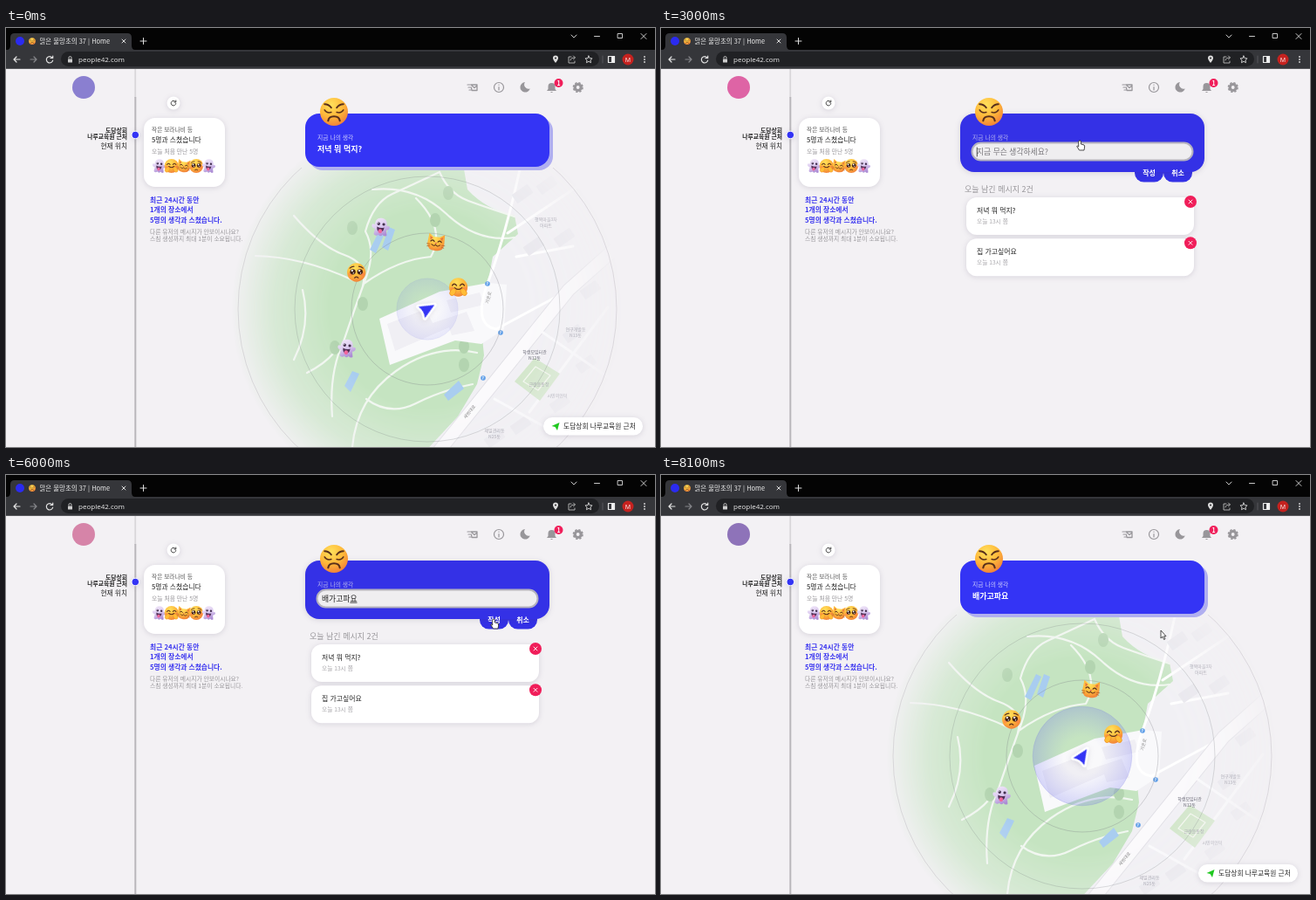
Recreate the animation shown at these times as an HTML page. Size 744 by 480 pixels, loop 8.2 s.

```html
<!DOCTYPE html>
<html lang="ko">
<head>
<meta charset="utf-8">
<title>Home</title>
<style>
html, body { margin: 0; width: 100%; height: 100%; overflow: hidden; background: #f3f1f4; }
svg { display: block; }
text { font-family: 'Noto Sans CJK KR', 'Noto Sans CJK', 'Noto Sans', sans-serif; }
.b { font-weight: 700; }
.ui { font-family: 'Open Sans', sans-serif; }
.rest { opacity: calc(1 - var(--p)); }
.act { opacity: var(--p); }
.tilt { transform: rotate(calc(8deg - var(--p) * 12deg)); transform-origin: 16px 16px; }
.soft { filter: drop-shadow(0 1px 3px rgba(60, 50, 90, .16)); }
</style>
</head>
<body>
<svg id="stage" width="744" height="480" viewBox="0 0 744 480"></svg>
<script>
const LOOP = 8200, OPEN = 2300, SUBMIT = 6400;
const BLUE = '#3434f5', GREY = '#98969a', CX = 483, CY = 322;
const PLACE = ['도담상회', '나루교육원 근처'];
const stage = document.getElementById('stage');

// markup helpers
const text = (x, y, size, str, fill = '#222', more = '') =>
  `<text x="${x}" y="${y}" font-size="${size}" fill="${fill}" ${more}>${str}</text>`;
const rect = (x, y, w, h, r, fill, more = '') =>
  `<rect x="${x}" y="${y}" width="${w}" height="${h}" rx="${r}" fill="${fill}" ${more}/>`;
const disc = (x, y, r, fill, more = '') => `<circle cx="${x}" cy="${y}" r="${r}" fill="${fill}" ${more}/>`;
const fill = (d, color, more = '') => `<path d="${d}" fill="${color}" ${more}/>`;
const line = (d, color, w = 1, more = '') =>
  `<path d="${d}" fill="none" stroke="${color}" stroke-width="${w}" stroke-linecap="round" stroke-linejoin="round" ${more}/>`;
const group = (id, body, more = '') => `<g id="${id}" ${more}>${body}</g>`;
const emoji = (kind, x, y, size, more = '') =>
  `<use href="#${kind}" x="${x - size / 2}" y="${y - size / 2}" width="${size}" height="${size}" ${more}/>`;
const symbol = (id, body) => `<symbol id="${id}" viewBox="0 0 32 32" overflow="visible">${body}</symbol>`;
const stop = (o, c, more = '') => `<stop offset="${o}" stop-color="${c}" ${more}/>`;
const bold = 'class="b"', mid = 'text-anchor="middle"', end = 'text-anchor="end"';

// emoji
const DARK = '#59301c';
const face = disc(16, 16, 15.5, 'url(#skin)');
const blush = disc(6, 19, 3.5, '#ff7350', 'opacity=".5"') + disc(26, 19, 3.5, '#ff7350', 'opacity=".5"');
const puff = x => disc(x, 26, 3.6, '#f7e9f0') + disc(x - 3, 28, 3, '#eee0ef') + disc(x + 3, 28.5, 3, '#fff5f5');
const hand = (x, a) => `<ellipse cx="${x}" cy="24" rx="4.5" ry="6.5" fill="#ffbd36" stroke="#ea8422" stroke-width=".8" transform="rotate(${a} ${x} 24)"/>`;
const symbols = [
  symbol('huff', face +
    line('M5.500 7.500Q10 7.500 13 11.500M26.500 7.500Q22 7.500 19 11.500', DARK, 1.8) +
    line('M5.500 14Q8 18 13 16.500M26.500 14Q24 18 19 16.500', DARK, 1.5) +
    line('M9.500 26Q10 21 16 21T22.500 26', DARK, 2, 'class="rest"') +
    `<g class="act">${line('M10.500 25Q11 21 16 21T21.500 25', DARK, 2)}${puff(4)}${puff(28)}</g>`),
  symbol('plead', face + blush + line('M5 9Q8 6 12 6M27 9Q24 6 20 6', DARK, 1.6) +
    `<g class="rest">${[10, 22].map(x => disc(x, 15, 4.6, '#432318') + disc(x - 1, 13, 1.7, '#fff') + disc(x + 1, 17, 1, '#fff')).join('')}</g>` +
    line('M5 15Q10 19 13 15M19 15Q22 19 27 15', DARK, 2, 'class="act"') +
    line('M13 25Q16 22 19 25', DARK, 1.8)),
  symbol('hug', face + blush + line('M6 13Q9 8 13 13M19 13Q23 8 26 13', DARK, 2) +
    `<g class="act">${fill('M7 18Q16 22 25 18Q23 25 16 25T7 18', '#7b2a22')}${fill('M12 24Q16 21 20 24Q16 26 12 24', '#ff7170')}</g>` +
    `<g class="rest">${line('M10 17Q16 22 22 17', DARK, 2)}${hand(7, 35)}${hand(25, -35)}</g>`),
  symbol('cat', `<g class="tilt">${fill('M3 2L11 7H21L29 2 30 18Q30 30 16 30T2 18Z', 'url(#skin)')}` +
    fill('M5 6l5 3-4 4zM27 6l-5 3 4 4z', '#e8773c') +
    line('M7 15Q10 11 13 15M19 15Q22 11 25 15', DARK, 1.8) +
    fill('M14 17h4l-2 2z', '#d6455a') +
    line('M9 20Q13 24 16 20Q19 24 23 20', DARK, 1.5) +
    `<g class="act">${fill('M12 22H20Q20 27 16 27T12 22', '#86302c')}</g>` +
    line('M1 20H6M2 24L6 23M31 20H26M30 24L26 23', '#a65a25', .9) + '</g>'),
  symbol('ghost', `<g class="tilt">${fill('M16 1C24 1 26 7 26 13Q31 11 31 15T26 20L28 29Q24 32 21 28 18 33 14 29 10 33 6 29L7 20Q1 19 1 15T6 13C6 6 8 1 16 1', 'url(#spook)')}` +
    disc(12, 11, 2.5, '#443150') + disc(20.5, 11, 2.3, '#443150') + disc(11.3, 10, .8, '#fff') +
    fill('M10 16Q16 19 22 16Q22 24 16 24T10 16', '#503056') +
    fill('M13 21Q16 18 19 21V25Q16 28 13 25Z', '#f1679c') + '</g>')
].join('');

const defs = `<defs>
<radialGradient id="skin" cx=".4" cy=".25" r=".85">${stop(0, '#ffe15c')}${stop(.5, '#ffb93a')}${stop(1, '#ee7538')}</radialGradient>
<linearGradient id="spook" x2=".6" y2="1">${stop(0, '#f6eefb')}${stop(.55, '#dccbf0')}${stop(1, '#ab8cd4')}</linearGradient>
<radialGradient id="fade" gradientUnits="userSpaceOnUse" cx="${CX}" cy="${CY}" r="225">${stop(.5, '#fff')}${stop(.78, '#fff', 'stop-opacity=".6"')}${stop(1, '#fff', 'stop-opacity="0"')}</radialGradient>
<mask id="spot">${rect(250, 150, 480, 330, 0, 'url(#fade)')}</mask>
<clipPath id="below">${rect(250, 160, 494, 320, 0, '#fff')}</clipPath>
<radialGradient id="wave">${stop(0, '#7777ee', 'id="waveIn" stop-opacity="0"')}${stop(1, '#6464ee', 'id="waveOut"')}</radialGradient>
${symbols}</defs>`;

// browser window
const chrome = rect(0, 0, 744, 46.8, 0, '#35363a') + rect(0, 0, 744, 25, 0, '#040404') +
  fill('M1 25Q5 25 5 20V11Q5 6 10 6H139Q144 6 144 11V20Q144 25 148 25Z', '#35363a') +
  disc(16, 15, 5, '#2b2bf0') + emoji('huff', 30, 15, 8) +
  text(38.5, 18, 7.45, '맑은 물망초의 37 | Home', '#eee') +
  line('M133 13l4 4m0-4l-4 4M154 15h7m-3.500-3.500v7', '#ddd') +
  line('M648 8l3 3 3-3M674.500 9.500h6M701.500 6.500h5v5h-5zM728 6.500l6 6m0-6l-6 6', '#ddd', .9) +
  rect(63, 27, 617, 17, 8.5, '#202124') +
  line('M16 36H9l3-3m-3 3l3 3', '#e4e4e4', 1.2) + line('M28 36h7l-3-3m3 3l-3 3', '#85868a', 1.2) +
  line('M53 34a3.700 3.700 0 1 0 .7 3M53.700 32v2.500H51', '#e4e4e4', 1.2) +
  rect(71, 35.5, 5, 4, .5, '#ccc') + line('M72 35v-1a1.500 1.500 0 0 1 3 0v1', '#ccc', .9) +
  text(83, 38.8, 8, 'people42.com', '#eee', 'class="ui"') +
  fill('M630 40Q627 36 627 34.500a3 3 0 0 1 6 0Q633 36 630 40', '#ddd') + disc(630, 34.5, 1, '#202124') +
  line('M648 33h-3v7h7v-2M647 37q0-3 5-3m-1.500-2l2 2-2 2', '#bbb', .9) +
  line('M668 32l1.200 2.600 2.800.3-2 2 .5 2.800-2.500-1.400-2.500 1.400.5-2.800-2-2 2.800-.3z', '#ddd', .9) +
  line('M684 32v8', '#606166', .8) + line('M690.500 32.500h7v7h-7z', '#eee', 1.2) + rect(694, 32, 4, 8, 0, '#eee') +
  disc(713, 36, 6.5, '#c5221f') + text(713, 38.5, 7, 'M', '#fff', `class="ui" ${mid}`) +
  [33, 36, 39].map(y => disc(732, y, .9, '#ddd')).join('');

// left column
const side = rect(147.3, 47, 1.8, 33, 0, '#d9d7da') + rect(147.3, 79, 2, 401, 0, '#b9b7bb') +
  disc(148.3, 122.5, 4.3, BLUE, 'stroke="#fff" stroke-width="1" class="soft"') +
  disc(89, 68, 13, '#8a7fd0', 'id="logo"') +
  text(139, 119.5, 6.8, PLACE[0], '#222', `${bold} ${end}`) +
  text(139, 127.3, 6.8, PLACE[1], '#222', `${bold} ${end}`) +
  text(139, 138, 7.7, '현재 위치', '#222', end) +
  disc(192, 86, 7.5, '#fff', 'class="soft"') +
  line('M194.300 84.500a2.800 2.800 0 1 0 .5 2M194.800 83v2h-2', '#333', .9) +
  rect(158, 103, 93, 79, 13, '#fff', 'class="soft"') +
  text(167, 119, 6.7, '작은 보라나비 등', '#555') +
  text(167, 131, 7.8, '5명과 스쳤습니다') +
  text(167, 144, 6.8, '오늘 처음 만난 5명', GREY) +
  ['ghost', 'hug', 'cat', 'plead', 'ghost'].map((k, i) => emoji(k, 175.5 + i * 14.2, 158, 16.5)).join('') +
  ['최근 24시간 동안', '1개의 장소에서', '5명의 생각과 스쳤습니다.'].map((s, i) => text(165, 199.5 + i * 11.6, 7.75, s, '#3a35f0', bold)).join('') +
  text(165, 236, 6.75, '다른 유저의 메시지가 안보이시나요?', GREY) +
  text(165, 244, 6.75, '스침 생성까지 최대 1분이 소요됩니다.', GREY);

const icons = line('M529 65h4m-3 3h3m-2 3h2', GREY, 1.2) + line('M533.500 65h6.500v6.500h-6l-.5-3M534 66l3 2.500 3-2.500', GREY, 1.3) +
  line('M570.500 68a5.500 5.500 0 1 1-11 0a5.500 5.500 0 1 1 11 0M565 67.500v3.500M565 65v.2', GREY, 1.2) +
  fill('M595 62a5.800 5.800 0 1 0 5.800 7.500A5 5 0 0 1 595 62', GREY) +
  fill('M620 72l1.500-2v-3q0-4 4-4t4 4v3l1.500 2zM624 73h3q-1.500 2-3 0', GREY) +
  disc(633.5, 63, 5, '#f01e5a') + text(633.5, 65.7, 7, '1', '#fff', `${bold} ${mid}`) +
  disc(655.7, 68, 3.5, 'none', `stroke="${GREY}" stroke-width="3.200"`) +
  disc(655.7, 68, 5.3, 'none', `stroke="${GREY}" stroke-width="1.600" stroke-dasharray="2.400 1.760"`);

// map
const label = (x, y, lines, color = '#8d8c99') => lines.map((s, i) => text(x, y + i * 6.5, 5, s, color, mid)).join('');
const land = rect(250, 150, 480, 330, 0, '#f1f0f4') +
  fill('M250 150H523L529 185Q550 208 583 215L587 236 558 262 552 294 545 345 548 375 540 408 518 445 476 490H250Z', '#c5e4c1') +
  line('M497 165Q465 180 443 190T412 233Q424 255 413 285T387 359Q370 395 374 445M286 261Q340 262 398 289M330 215Q360 250 388 260T409 295M345 395Q365 385 376 372M420 185Q470 180 505 213T583 240M497 165Q508 190 530 198T583 216M410 293Q450 265 487 262Q505 230 470 195M397 480Q402 425 447 393T540 372M413 425Q440 445 470 430T535 408M340 300Q350 340 330 380', '#f1f7f0', 2.2) +
  [[492, 220], [397, 229], [377, 366], [525, 386], [507, 189], [409, 316], [525, 365]].map(([x, y]) => `<ellipse cx="${x}" cy="${y}" rx="6" ry="8" fill="#b3d4b0"/>`).join('') +
  fill('M417 254L430 228 436 231 424 258ZM431 251L439 228 446 231 438 255ZM388 410l9-17 8 3-10 21zM502 420l17-16 6 9-18 14z', '#a9cdf0') +
  fill('M428 333L497 302 553 292 574 294 571 345 545 362 515 358 440 386Z', '#f9f9fb') +
  fill('M437 339l44-17 8 16 39-13 9 22-26 5-3-9-62 27zM505 312l38-9 5 14-38 9z', '#f0eff4') +
  line('M590 158Q572 240 553 290T562 345M575 235L680 165M562 345L640 303M585 262L650 250', '#fff', 3) +
  line('M735 220L645 300 492 490', '#e0dfe5', 16) + line('M735 220L645 300 492 490', '#fbfafc', 14) +
  [[592, 190], [620, 180], [605, 250], [640, 240], [650, 350], [635, 430], [590, 455], [665, 385], [560, 470], [670, 300]]
    .map(([x, y]) => rect(x - 11, y - 6, 22, 12, 1, '#e8e7ed', `transform="rotate(-35 ${x} ${y})"`)).join('') +
  line('M610 345L690 400M560 425L650 475M690 320L600 440', '#fafafc', 3) +
  fill('M583 405L606 378 635 396 612 427Z', '#cfe5c6') + line('M593 405l14-17 17 10-14 17z', '#f3f7ee', 1.2) +
  label(619, 221, ['행복마을3차', '아파트']) + label(606, 373, ['학생모임터관', 'N12동'], '#555463') +
  label(611, 410, ['근린운동장']) + label(653, 347, ['연구개발동', 'N13동']) + label(560, 463, ['제일관리동', 'N25동']) + label(632, 423, ['시민의언덕']) +
  text(553, 316, 5, '가온로', '#888', 'transform="rotate(-75 553 316)"') + text(527, 448, 5, '새벗대로', '#777', 'transform="rotate(-51 527 448)"') +
  [[552, 293], [567, 349], [547, 401]].map(([x, y]) => disc(x, y, 2.8, '#5f9ee8') + text(x, y + 1.7, 4.5, 'P', '#fff', mid)).join('');

const map = group('land', land, 'mask="url(#spot)"') +
  group('wide', label(467, 248, ['세한']) + label(463, 268, ['북쪽언덕길']) + label(482, 305, ['새마을']) + text(497, 325, 7, '대한민국', '#85848b', mid), 'clip-path="url(#below)"') +
  group('rings', [87, 152, 217].map((r, i) => disc(CX, CY, r, 'none', `stroke="#77767f" stroke-width=".6" opacity="${.5 - i * .08}"`)).join(''), 'clip-path="url(#below)"') +
  disc(CX, CY, 0, 'url(#wave)', 'id="pulse" stroke="#7272d8" stroke-width=".6"') +
  emoji('ghost', 429.5, 228, 22, 'id="guest"') + emoji('cat', 493, 245.5, 22) + emoji('plead', 401.7, 280, 22) +
  emoji('hug', 518.5, 297, 22) + emoji('ghost', 390.5, 367, 22) +
  group('arrow', fill('M0-9.500L7.500 7.500Q0 4-7.500 7.500Z', BLUE, 'stroke="#fff" stroke-width="5" stroke-linejoin="round" paint-order="stroke"'), 'class="soft"');

const spotButton = rect(616, 446, 114, 20.5, 10.2, '#fff', 'class="soft"') +
  fill('M625.500 456l9-4-2.500 9-2.500-4z', '#20c820') + text(639, 459, 7.75, PLACE.join(' '));

// thought box, closed and open
const closed = rect(343, 98, 280, 61, 16, '#b0aff0', 'id="shade"') + rect(343, 98, 280, 61, 16, BLUE, 'id="box"') +
  text(357, 128, 6.8, '지금 나의 생각', '#cfcffc') + text(357, 142, 9, '', '#fff', `${bold} id="thought"`);
const note = (y, s) => rect(350, y, 261, 43, 12, '#fff', 'class="soft"') + text(362, y + 18, 7.9, s) +
  text(362, y + 30, 6.7, '오늘 13시 쯤', '#aaa8ac') + disc(607, y + 5, 7, '#f01e5a') +
  line(`M605 ${y + 3}l4 4m0-4l-4 4`, '#fff', .9);
const EDIT = '#3431e6';
const editor = rect(543, 155, 33, 21.5, 10.5, EDIT) + rect(576, 155, 33, 21.5, 10.5, EDIT) +
  rect(343, 98, 280, 67, 16, EDIT, 'class="soft"') +
  text(559.5, 169, 8, '작성', '#fff', `${bold} ${mid}`) + text(592.5, 169, 8, '취소', '#fff', `${bold} ${mid}`) +
  text(357, 127.5, 6.8, '지금 나의 생각', '#b5b3ee') +
  rect(356.5, 131.5, 253, 20, 10, '#efeef0', 'stroke="#b4b2be" stroke-width="2"') +
  text(362, 144.7, 8.8, '', '#222', 'id="typed"') + line('M362.300 137v10', '#222', .8, 'id="caret"') +
  group('list', text(348, 188, 9, '오늘 남긴 메시지 2건', GREY) + note(194, '저녁 뭐 먹지?') + note(241.3, '집 가고싶어요'));

const pointer = group('cursor',
  fill('M0 0V9L2 7.200 3.600 10.500 5 9.800 3.500 6.700H6Z', '#fff', 'id="tip" stroke="#222" stroke-width=".8"') +
  fill('M0 0Q1.300-.3 1.400 1V4L5 5Q6 5.500 5.500 8L5 11H-.5L-3.300 6.500Q-2.500 5.500-1.300 7V1Q-1.200 0 0 0', '#fff', 'id="hand" stroke="#222" stroke-width=".8"'));

stage.innerHTML = defs + rect(0, 0, 744, 480, 0, '#f3f1f4') + group('map', map) + group('spot', spotButton) +
  side + icons + group('closed', closed) + group('editor', editor) + emoji('huff', 376, 96, 33) + chrome + pointer;

// motion
const el = {};
stage.querySelectorAll('[id]').forEach(e => el[e.id] = e);
const set = (id, attrs) => { for (const k in attrs) el[id].setAttribute(k, attrs[k]); };
const show = (id, on) => { el[id].style.display = on ? '' : 'none'; };
const clamp = v => Math.max(0, Math.min(1, v));
const ramp = (t, a, b) => clamp((t - a) / (b - a));

// linear track through [time, ...values] points
function track(t, keys) {
  const i = keys.findIndex(k => k[0] > t);
  if (i < 0) return keys[keys.length - 1].slice(1);
  if (!i) return keys[0].slice(1);
  const a = keys[i - 1], b = keys[i], u = (t - a[0]) / (b[0] - a[0]);
  return a.slice(1).map((v, j) => v + (b[j + 1] - v) * u);
}

const STEPS = ['ㅂ', '배', '백', '배가', '배각', '배가고', '배가곺', '배가고파', '배가고팡', '배가고파요'];
const LOGO = [[0, 138, 127, 208], [1200, 152, 122, 208], [3000, 222, 100, 165], [4900, 238, 142, 145], [6800, 196, 125, 185], [8100, 142, 115, 185]];
const PATH = [[500, 690, 452], [1200, 516, 216], [1700, 480, 129], [5500, 480, 129], [6000, 559, 165], [6400, 560, 165], [6800, 565, 166], [8100, 573, 178]];
const TURN = [[0, 60], [1200, 35], [1900, 0], [6800, 0], [8100, 33]];

function draw(t) {
  const editing = t >= OPEN && t < SUBMIT, before = t < OPEN;
  const hover = t >= 1600 && before;

  // shared expression cycle
  const beat = Math.abs((t + 200) % 2800 - 1400);
  stage.style.setProperty('--p', 1 - ramp(beat, 350, 550));
  set('logo', { fill: `rgb(${track(t, LOGO)})` });

  show('closed', !editing);
  show('editor', editing);
  set('closed', { transform: hover ? 'translate(483 128.500) scale(.99) translate(-483 -128.500)' : '' });
  set('shade', { transform: hover ? 'translate(3 8)' : 'translate(4 4)' });
  set('box', { fill: hover ? '#3332e8' : BLUE });
  el.thought.textContent = before ? '저녁 뭐 먹지?' : '배가고파요';

  set('list', { opacity: ramp(t, OPEN, 2700) });
  const n = Math.min(STEPS.length, Math.floor((t - 3700) / 110) + 1);
  const s = n > 0 ? STEPS[n - 1] : '';
  const last = t < 6100 ? 'underline' : 'none';
  el.typed.innerHTML = s ? `${s.slice(0, -1)}<tspan text-decoration="${last}">${s.slice(-1)}</tspan>` : '지금 무슨 생각하세요?';
  set('typed', { fill: s ? '#222' : '#77757a' });
  show('caret', !s && t % 1000 < 500);

  show('map', !editing && (before || t >= 6500));
  show('spot', !editing);
  show('guest', before);
  set('land', { opacity: before ? 1 : track(t, [[6500, .15], [6800, .4], [7300, 1]])[0] });
  set('wide', { opacity: before ? 0 : 1 - ramp(t, 6800, 7100) });
  set('rings', { opacity: before ? 1 : ramp(t, 6900, 7300) });
  const age = Math.max(0, before ? t + 820 : t - 6775), r = age * .0429;
  set('pulse', { r, 'stroke-opacity': ramp(age, 200, 2000) * .45 });
  set('waveIn', { offset: track(r, [[35, .3], [87, .5], [117, .68]])[0] });
  set('waveOut', { 'stop-opacity': track(age, [[0, 0], [820, .12], [1330, .24], [2020, .42], [2720, .5]])[0] });
  set('arrow', { transform: `translate(${CX} ${CY}) rotate(${track(t, TURN)})` });

  show('cursor', t >= 500);
  set('cursor', { transform: `translate(${track(t, PATH)})` });
  const pointing = t >= 1600 && t < SUBMIT;
  show('hand', pointing);
  show('tip', !pointing);
}

function tick() {
  draw(Math.floor(performance.now() % LOOP / 100) * 100);
  requestAnimationFrame(tick);
}
tick();
</script>
</body>
</html>
```
